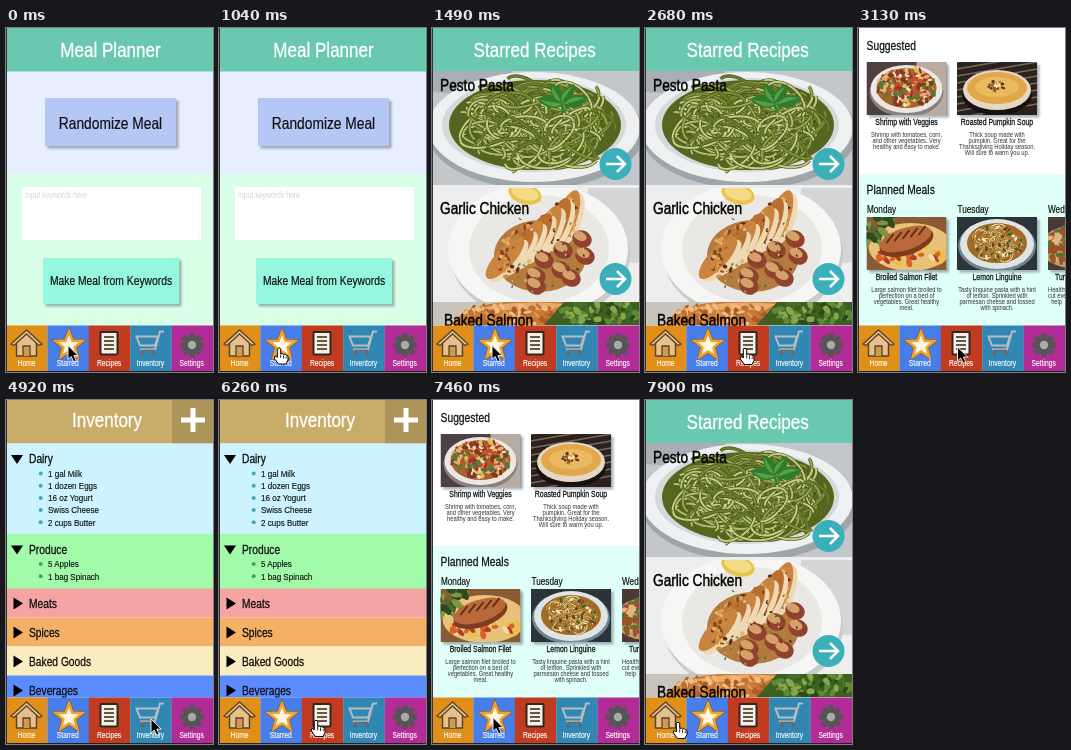
An HTML page that plays this animation: 207 by 344 pixels, repeating every 8 s.

```html
<!DOCTYPE html>
<html lang="en">
<head>
<meta charset="utf-8">
<title>Meal Planner</title>
<style>
html, body { margin: 0; width: 100%; height: 100%; overflow: hidden; background: #fff; }
svg { display: block; }
#stage { width: 100vw; height: 100vh; }
text { font-family: "Liberation Sans", Arial, sans-serif; white-space: pre; }
</style>
</head>
<body>
<svg id="stage" viewBox="0 0 207 344" preserveAspectRatio="none"></svg>
<script>
const LOOP = 8000;
const CONDENSED = 0.82;
const stage = document.getElementById('stage');

let seed = 7;
const rnd = () => (seed = seed * 16807 % 2147483647) / 2147483647;
const pick = list => list[Math.floor(rnd() * list.length)];
const times = (n, draw) => Array.from({ length: n }, (_, i) => draw(i)).join('');

// Basic shapes
const rect = (x, y, w, h, fill, more = '') =>
  `<rect x="${x}" y="${y}" width="${w}" height="${h}" fill="${fill}" ${more}/>`;
const oval = (x, y, rx, ry, fill, turn = 0, more = '') =>
  `<ellipse rx="${rx}" ry="${ry}" fill="${fill}" transform="translate(${x} ${y}) rotate(${turn})" ${more}/>`;
const path = (d, fill, stroke = 'none', width = 1, more = '') =>
  `<path d="${d}" fill="${fill}" stroke="${stroke}" stroke-width="${width}" ${more}/>`;
const text = (x, y, size, str, { fill = '#111', anchor = 'start', bold = 0 } = {}) =>
  `<text transform="translate(${x} ${y}) scale(${CONDENSED} 1)" font-size="${size}" fill="${fill}"
    stroke="${fill}" stroke-width="${bold}" text-anchor="${anchor}">${str}</text>`;
const centered = (x, y, size, str, more) => text(x, y, size, str, { anchor: 'middle', ...more });
const shadow = (x, y, w, h) => rect(x + 2.5, y + 2.5, w, h, '#456', 'opacity=".45" filter="url(#soft)"');

// Food textures: points are spread evenly over an oval
function spot(cx, cy, rx, ry) {
  const a = rnd() * Math.PI * 2, r = Math.sqrt(rnd());
  return [cx + Math.cos(a) * r * rx, cy + Math.sin(a) * r * ry];
}
const bits = (n, cx, cy, rx, ry, size, colors) => times(n, () => {
  const [x, y] = spot(cx, cy, rx, ry);
  return oval(x, y, size * (.6 + rnd() * .6), size * (.3 + rnd() * .4), pick(colors), rnd() * 180);
});
// Noodles: part of a flat loop, with a dark underside and a light top
const noodles = (n, cx, cy, rx, ry, width, colors, dark) => times(n, () => {
  const [x, y] = spot(cx, cy, rx * .68, ry * .68);
  const a = rx * (.16 + rnd() * .18), b = ry * (.14 + rnd() * .22);
  const d = `M${x - a},${y}a${a},${b} 0 0 ${rnd() < .7 ? 1 : 0} ${a * 2},${b * (rnd() - .3)}`;
  const turn = `transform="rotate(${rnd() * 90 - 45} ${x} ${y})"`;
  return path(d, 'none', dark, width * 1.7, turn) + path(d, 'none', pick(colors), width, turn);
});
const photo = (x, y, w, h, bg, content) =>
  `<svg x="${x}" y="${y}" width="${w}" height="${h}">${rect(0, 0, w, h, bg)}` +
  `<g filter="url(#lens)">${content}</g></svg>`;
const leaf = (x, y, turn, scale = 1) =>
  `<g transform="translate(${x} ${y}) rotate(${turn}) scale(${scale})">` +
  path('M0,0Q7,-11 23,-2Q12,10 0,0', '#2f7a2c') + path('M1,0Q7,-8 20,-2', '#55a047') + '</g>';

const pestoPhoto = () => photo(0, 43, 207, 114, '#c3c7ca',
  oval(20, 0, 60, 22, '#a9afb5') + oval(104, 62, 108, 56, '#9fa6aa') + oval(102, 56, 106, 55, '#eef0f1') +
  oval(102, 54, 92, 47, '#d5d9da') + oval(103, 54, 86, 45, '#56651f') +
  noodles(230, 103, 54, 86, 45, 2, ['#7f9038', '#98a64e', '#b4bf6e', '#c6cd86', '#6d7d2c'], '#4d5c1d') +
  bits(70, 103, 56, 72, 38, 1.6, ['#3b511b', '#4e6724', '#dadfa6']) +
  leaf(132, 33, -165, 1.2) + leaf(130, 32, -115) + leaf(131, 34, -12, 1.15) + leaf(129, 32, -50) + leaf(130, 32, 75, .5));

function chickenPhoto() {
  const slice = i => {
    const x = 136 - i * 10.5, y = 28 + i * 7, turn = 18 + i * 4;
    return oval(x + 4, y + 3, 10, 27, '#efd9b5', turn) + oval(x, y, 9.5, 27, i % 2 ? '#b86f2f' : '#c98440', turn) +
      bits(24, x, y, 8, 20, 3.2, ['#8a4a1e', '#dc9c52', '#5d3014', '#cf8a3e', '#e8b570']);
  };
  const potatoes = [[104, 88], [112, 72], [131, 62], [150, 51], [153, 68], [129, 82], [104, 98], [139, 90]];
  return photo(0, 160, 207, 114, '#eeeeef',
    oval(200, 15, 45, 60, '#d3d5d7') + oval(108, 66, 90, 67, '#c9cbcd') + oval(106, 61, 90, 66, '#f6f6f5') +
    oval(107, 61, 70, 54, '#eae8e4') + oval(93, 6, 17, 10, '#e8c44d', 15) + oval(93, 5, 14, 7, '#f3dc85', 15) +
    oval(108, 68, 46, 36, '#b47b3f') + times(7, slice) +
    potatoes.map(([x, y]) => oval(x, y, 10, 8.5, '#8f432f', 25) + oval(x - 2, y - 3, 7, 4.5, '#d6a069', 25)).join('') +
    bits(45, 107, 65, 46, 42, 1.5, ['#4b6a2b', '#6c8541', '#512c15', '#f0d5a2']));
}

const salmonPhoto = () => photo(0, 274, 207, 23, '#c9c4ba',
  path('M20,23Q30,3 75,0H150L118,23z', '#c97a35') + path('M40,9Q75,-3 132,2L120,8Q75,7 40,9', '#e8ac68') +
  bits(75, 78, 13, 48, 11, 4, ['#dc9650', '#a95d27', '#efbd82', '#c17035']) +
  path('M132,0H207V23H112z', '#3f5f22') +
  bits(75, 168, 11, 40, 14, 4.5, ['#5f8a34', '#2c4a1a', '#85a84d', '#43702a']));

const cards = [
  () => rect(50, 0, 30, 53, '#b9aba0') + oval(40, 30, 37, 25, '#8a817c') + oval(40, 27, 36, 24, '#ece7e3') +
    oval(40, 26, 30, 20, '#a8632f') +
    bits(190, 40, 25, 29, 19, 3.4, ['#e5a878', '#f4dfc0', '#c9502f', '#a3302a', '#e6bd5d', '#56783a', '#7a3b20']),
  () => times(9, i => path(`M0,${i * 7}L80,${i * 7 - 14}`, 'none', '#7a6858', 1.6)) +
    oval(40, 33, 35, 20, '#171210') + oval(40, 28, 34, 20, '#e4d8c4') + oval(40, 26, 30, 16, '#e2a74a') +
    oval(40, 25, 22, 10, '#ebb95f') + bits(28, 39, 24, 9, 5, 2, ['#7a4a22', '#fff2d5', '#5a3016', '#a8682f']),
  () => oval(44, 30, 42, 24, '#e9c27a') + bits(26, 10, 12, 20, 16, 6, ['#4d6b2c', '#7c9444', '#314a1d']) +
    bits(34, 45, 38, 34, 12, 5, ['#e8c04a', '#d9622b', '#f2dda8', '#b43c24']) +
    oval(40, 25, 28, 13, '#7d3c1f', -18) + oval(39, 22, 27, 11, '#b9683a', -18) +
    times(5, i => path(`M${20 + i * 8},${26 - i * 2}l7,-9`, 'none', '#5b2a15', 1.8)),
  () => oval(40, 29, 39, 26, '#6f8591') + oval(40, 27, 37, 25, '#dfe3e2') + oval(40, 26, 30, 20, '#a06a28') +
    noodles(80, 40, 26, 30, 20, 1.1, ['#e9c77c', '#d2a550', '#f3dfa6', '#c08a38'], '#8a5c24') +
    bits(36, 40, 26, 25, 17, 2.4, ['#3f6427', '#6b3d1d', '#f7edc9']),
  () => oval(25, 30, 33, 21, '#cd9a61') + bits(90, 25, 28, 30, 19, 5, ['#9b5228', '#e1b67e', '#5c7232', '#bd4132'])
];
const cardColors = ['#4d3f42', '#2b221e', '#8a5a35', '#2c333a', '#4a3a35'];

function card(i, x, y, title, lines) {
  const mid = x + 40;
  return shadow(x, y, 80, 53) + photo(x, y, 80, 53, cardColors[i], cards[i]()) +
    centered(mid, y + 62.5, 8.4, title, { bold: .25 }) +
    lines.map((line, n) => centered(mid, y + 74.5 + n * 6.3, 7, line, { fill: '#333' })).join('');
}

const header = (title, fill = '#6ac8b1', x = 102.7, y = 29) =>
  rect(0, 0, 207, 43.5, fill) + centered(x, y, 20.8, title, { fill: '#fff', bold: .3 });
const button = (x, y, w, h, fill, label, size, base) => shadow(x, y, w, h) +
  rect(x, y, w, h, fill) + centered(x + w / 2, base, size, label, { bold: .2 });
const goArrow = y => oval(183.5, y, 16, 16, '#3bb0bb') +
  path(`M174,${y}h19m-8,-8l8,8l-8,8`, 'none', '#fff', 2.5);

function homePage() {
  return rect(0, 43, 207, 104, '#e6eeff') + rect(0, 146, 207, 152, '#d9ffe7') + header('Meal Planner', '#6ac8b1', 104.5) +
    button(39, 70, 131, 48, '#b5c7f4', 'Randomize Meal', 16.8, 100.5) +
    rect(16, 159, 179, 53, '#fff') + text(19, 170, 8.4, 'Input keywords here', { fill: '#d4d4d4' }) +
    button(37, 230, 136, 46, '#96f7df', 'Make Meal from Keywords', 12.6, 257);
}

function starredPage() {
  const label = (x, y, str) => text(x, y, 16.7, str, { fill: '#000', bold: .45 });
  return rect(0, 0, 207, 298, '#eee') + header('Starred Recipes') +
    pestoPhoto() + chickenPhoto() + salmonPhoto() + goArrow(136) + goArrow(251) +
    label(8, 63, 'Pesto Pasta') + label(8, 186, 'Garlic Chicken') + label(12, 298, 'Baked Salmon');
}

function recipesPage() {
  return rect(0, 0, 207, 146, '#fff') + rect(0, 146, 207, 152, '#dffff8') +
    text(8.5, 22, 12.6, 'Suggested', { bold: .25 }) + text(8.5, 166, 12.6, 'Planned Meals', { bold: .25 }) +
    ['Monday', 'Tuesday', 'Wednesday'].map((day, i) => text(9 + i * 90.5, 185, 10, day, { bold: .2 })).join('') +
    card(0, 8.5, 34, 'Shrimp with Veggies',
      ['Shrimp with tomatoes, corn,', 'and other vegetables. Very', 'healthy and easy to make.']) +
    card(1, 99, 34, 'Roasted Pumpkin Soup',
      ['Thick soup made with', 'pumpkin. Great for the', 'Thanksgiving Holiday season.', 'Will sure to warm you up.']) +
    card(2, 8.5, 189, 'Broiled Salmon Filet',
      ['Large salmon filet broiled to', 'perfection on a bed of', 'vegetables. Great healthy', 'meal.']) +
    card(3, 99, 189, 'Lemon Linguine',
      ['Tasty linguine pasta with a hint', 'of lemon. Sprinkled with', 'parmesan cheese and tossed', 'with spinach.']) +
    card(4, 190, 189, '', []) + text(197, 251.5, 8.4, 'Turkey', { bold: .25 }) +
    ['Healthy', 'cut every', '  help'].map((line, i) => text(190, 263.5 + i * 6.3, 7, line, { fill: '#333' })).join('');
}

function inventoryPage() {
  const section = (y, h, fill, name, bullet, items = []) => {
    const mid = y + 15.5;
    const marker = items.length ? `M5,${mid - 4}h12l-6,9z` : `M7.5,${mid - 6.5}v12l9.5,-6z`;
    return rect(0, y, 207, h, fill) + path(marker, '#000') + text(23, y + 19.5, 12.5, name, { bold: .3 }) +
      items.map((item, i) => oval(34.7, y + 30 + i * 12.2, 2, 2, bullet) +
        text(42, y + 33.3 + i * 12.2, 9.8, item, { bold: .15 })).join('');
  };
  return header('Inventory', '#c9ac69', 101, 27) + rect(166, 0, 41, 43.5, '#ad9459') +
    path('M175,20h24M187,8v24', 'none', '#fff', 5) +
    section(43.5, 91, '#ccf3ff', 'Dairy', '#3fa9bd',
      ['1 gal Milk', '1 dozen Eggs', '16 oz Yogurt', 'Swiss Cheese', '2 cups Butter']) +
    section(134, 55, '#a2fba9', 'Produce', '#42a45a', ['5 Apples', '1 bag Spinach']) +
    section(188.5, 29, '#f6a3a3', 'Meats') + section(217.5, 29, '#f4b166', 'Spices') +
    section(246.5, 29, '#faedc0', 'Baked Goods') + section(275.5, 22, '#5a8bff', 'Beverages');
}

function navBar() {
  const starPoints = times(10, i => {
    const r = i % 2 ? 6 : 14, a = i * Math.PI / 5;
    return `${63 + Math.sin(a) * r},${317.5 - Math.cos(a) * r} `;
  });
  const star = (stroke, width) =>
    `<polygon points="${starPoints}" fill="#fff6e0" stroke="${stroke}" stroke-width="${width}"/>`;
  const icons = [
    path('M10.5,314v14h20v-14L20.5,304z', '#e6c08c', '#5b4326', 1.5) +
      path('M17,328v-10h7v10', '#d09a55', '#5b4326', 1.3) +
      path('M5,316L20.5,302L36,316l-3,1.5L20.5,306L8,317.5z', '#e6c08c', '#5b4326', 1.3),
    star('#7a5320', 3.6) + star('#f0a22e', 2.6),
    rect(94.5, 304, 17, 22.5, '#f7efe1', 'stroke="#302820" stroke-width="2" rx="1"') +
      path('M98,309h10m-10,4h10m-10,4h10m-10,4h10', 'none', '#302820', 1.7),
    path('M158,303.5h-4l-5,18h-15M130.5,308.5h21.5l-3,9h-15z', 'none', '#b9bcbe', 2) +
      path('M135,322.5h14', 'none', '#6d6560', 1.5) +
      oval(136.5, 325.5, 2, 2, '#6d6560') + oval(148, 325.5, 2, 2, '#6d6560'),
    times(8, i => rect(-2.5, -12, 5, 6, '#555', `transform="translate(186 317) rotate(${i * 45})"`)) +
      oval(186, 317, 6.7, 6.7, '#aaa', 0, 'stroke="#555" stroke-width="5"')
  ];
  const tabs = [['Home', '#e09019'], ['Starred', '#477eea'], ['Recipes', '#c03b20'],
    ['Inventory', '#3187b4'], ['Settings', '#b22b97']];
  return tabs.map(([name, fill], i) => rect(i * 41.4, 297.5, 41.6, 46, fill) + icons[i] +
    centered(20.5 + i * 41.3, 338, 8.2, name, { fill: '#fff', bold: .15 })).join('') +
    rect(0, 343, 207, 1, '#222') + rect(0, 0, 1, 344, '#333');
}

const pages = { home: homePage, starred: starredPage, recipes: recipesPage, inventory: inventoryPage };
const cursors = {
  arrow: path('M0,0v14l3.2,-3 2.5,5.3 2.5,-1.2 -2.4,-5h4.3z', '#000', '#fff', .9),
  hand: path('M-1.7,9V1.3Q0,-1 1.7,1.3V6.5Q3.5,5.3 4.5,7Q6.5,6 7.3,7.8Q9.5,7.5 9,10V12.5L7,16.5H-.5L-4.6,11Q-5.3,8.2 -3,8.7L-1.7,10z',
    '#fff', '#000', 1) + path('M1.7,7v3.5M4.5,8v3M7.2,9v2', 'none', '#000', .8)
};

stage.innerHTML = '<defs><filter id="soft"><feGaussianBlur stdDeviation="1.3"/></filter>' +
  '<filter id="lens"><feGaussianBlur stdDeviation=".4"/></filter></defs>' +
  Object.entries(pages).map(([id, draw]) => `<g id="${id}">${draw()}</g>`).join('') + navBar() +
  Object.entries(cursors).map(([id, shape]) => `<g id="${id}">${shape}</g>`).join('');

const pageCuts = [[0, 'home'], [1490, 'starred'], [3130, 'recipes'], [4920, 'inventory'],
  [6560, 'recipes'], [7610, 'starred']];
// Time, pointer kind and tip position
const pointerSteps = [
  [0, 'arrow', 62, 317.5], [890, 'hand', 56, 319], [1040, 'hand', 60, 319.5], [1490, 'arrow', 60, 317.5],
  [2240, 'hand', 62, 319], [2390, 'hand', 78, 319.5], [2540, 'hand', 95, 320], [2680, 'hand', 100, 320],
  [3130, 'arrow', 99.5, 319], [4030, 'hand', 102, 320], [4180, 'hand', 113, 320], [4330, 'hand', 128, 320.5],
  [4480, 'hand', 140, 320.5], [4620, 'hand', 144, 320], [4770, 'hand', 145, 320.5], [4920, 'arrow', 145, 319],
  [5970, 'hand', 143, 320], [6110, 'hand', 115, 320], [6260, 'hand', 97, 320], [6560, 'arrow', 97, 318],
  [7010, 'hand', 88, 319.5], [7160, 'hand', 68, 319], [7310, 'hand', 62, 319], [7460, 'arrow', 61, 317.5],
  [7750, 'hand', 46, 320], [7900, 'hand', 33, 322]
];
const current = (list, t) => list.findLast(([start]) => start <= t);
const showOnly = (group, id) => Object.keys(group).forEach(key => {
  document.getElementById(key).style.display = key === id ? '' : 'none';
});

function render(now) {
  const t = now % LOOP;
  const [, kind, x, y] = current(pointerSteps, t);
  showOnly(pages, current(pageCuts, t)[1]);
  showOnly(cursors, kind);
  document.getElementById(kind).setAttribute('transform', `translate(${x} ${y})`);
}
function tick() {
  render(performance.now());
  requestAnimationFrame(tick);
}
tick();
</script>
</body>
</html>
```
